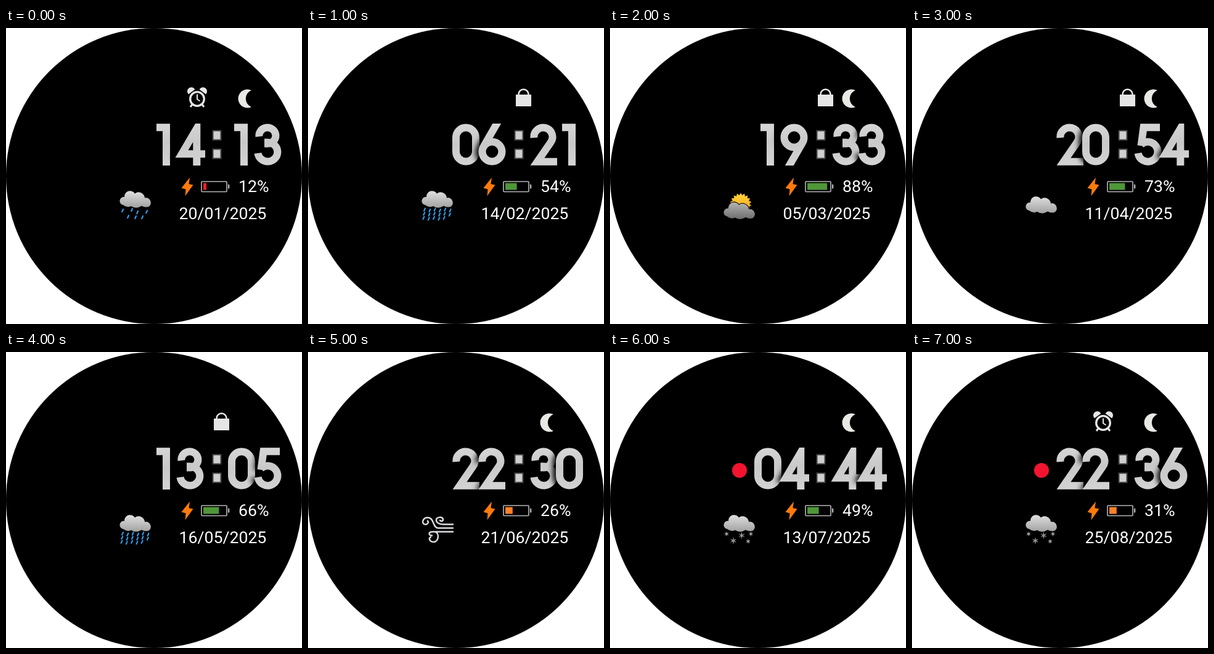
An HTML page for the animation above (8 s loop, 480 by 480 pixels).

```html
<!DOCTYPE html>
<html lang="en">
<head>
<meta charset="utf-8">
<title>Watch face</title>
<style>
  html, body { margin: 0; width: 100%; height: 100%; overflow: hidden; background: #fff; }
  svg { display: block; width: 100%; height: 100%; }
  text { font: 26.67px Roboto, sans-serif; fill: #fff; }
  .digit { fill: none; stroke: url(#metal); stroke-width: 12; stroke-miterlimit: 6; }
  .over { filter: drop-shadow(-5px 1px 4px #000); }
  .drops { stroke: #2f9be8; stroke-width: 2.2; stroke-linecap: round; }
  .flakes { fill: none; stroke: #b4b4b4; stroke-width: .9; }
  .wind { fill: none; stroke: #dcdce2; stroke-width: 2.5; stroke-linecap: round; }
</style>
</head>
<body>
<svg viewBox="0 0 480 480">
  <defs>
    <linearGradient id="metal" gradientUnits="userSpaceOnUse" x1="0" y1="0" x2="10" y2="68">
      <stop stop-color="#d8d8d8"/><stop offset=".5" stop-color="#c9c9c9"/><stop offset="1" stop-color="#d3d3d3"/>
    </linearGradient>
    <linearGradient id="light" gradientUnits="userSpaceOnUse" x1="0" y1="265" x2="0" y2="291">
      <stop stop-color="#dedede"/><stop offset="1" stop-color="#a2a2a2"/>
    </linearGradient>
    <linearGradient id="dull" gradientUnits="userSpaceOnUse" x1="0" y1="265" x2="0" y2="291">
      <stop stop-color="#b2b2b2"/><stop offset="1" stop-color="#6f6f6f"/>
    </linearGradient>
    <linearGradient id="sun" x1="0" y1="0" x2="0" y2="1">
      <stop stop-color="#ffd63c"/><stop offset="1" stop-color="#f59a14"/>
    </linearGradient>
    <clipPath id="band"><rect y="155" width="480" height="68"/></clipPath>
    <path id="cloud" d="M190 287A6.500 6.500 0 1 1 192 274A9.200 9.200 0 0 1 209 268.500A10 10 0 0 1 225 275.500A8.100 8.100 0 0 1 232 289.500Q226 292 220 288.500Q211 294 203 289Q196 292 190 287Z"/>
  </defs>

  <circle cx="240" cy="240" r="240"/>

  <g id="alarm" fill="none" stroke="#e6e6e6">
    <circle cx="310" cy="115" r="11.300" stroke-width="3.300"/>
    <path d="M310 107.500V115.500L314.500 118.500" stroke-width="2"/>
    <path d="M302 124L299 128M318 124L321 128" stroke-width="3"/>
    <path d="M296 106A5.300 5.300 0 0 1 305 99.500ZM324 106A5.300 5.300 0 0 0 315 99.500Z" fill="#e6e6e6" stroke-width="2"/>
  </g>
  <g id="lock" fill="#e6e6e6">
    <rect x="337" y="108" width="25" height="19"/>
    <path d="M341.500 109V107.500A8 8 0 0 1 357.500 107.500V109" fill="none" stroke="#e6e6e6" stroke-width="2.600"/>
  </g>
  <path id="moon" d="M398 101A15 15 0 1 0 398 128A14.500 14.500 0 0 1 398 101Z" fill="#e8e8e4"/>

  <g id="clock" clip-path="url(#band)"></g>
  <g fill="#cfcfcf" stroke="#444" stroke-width="2">
    <rect x="335.500" y="166.500" width="13" height="15"/>
    <rect x="335.500" y="196.500" width="13" height="15"/>
  </g>

  <circle id="link" cx="210" cy="192" r="12" fill="#f3142f"/>

  <path d="M298 242.500L284.500 259.500L291.500 261.500L290.500 272.500L303.500 254.500L296.500 253Z" fill="#ff7a0c"/>
  <rect x="317" y="249" width="41" height="16.500" rx="1" fill="none" stroke="#b8b8b8" stroke-width="1.600"/>
  <path d="M360 253.500H361Q362.300 253.500 362.300 255V259Q362.300 260.500 361 260.500H360Z" fill="#b8b8b8"/>
  <rect id="level" x="320" y="251.500" height="11"/>
  <text id="percent" x="377" y="266"></text>
  <text id="date" x="280.500" y="310"></text>
  <g id="weather"></g>
</svg>

<script>
const $ = id => document.getElementById(id);

const ring = y => `M39.5 ${y}a16 16 0 1 1-32 0a16 16 0 1 1 32 0z`;
const glyphs = {
  0: 'M7 22.5A16 16 0 0 1 39 22.500V45.500A16 16 0 0 1 7 45.500Z',
  1: 'M11 6.300H27V68',
  2: 'M7.500 23A15 15 0 1 1 34.500 30.500L13 61.700H45',
  3: 'M9.500 21A13.500 13 0 1 1 23 32.500H18M18 30.500H23.500A16 15.500 0 1 1 7.500 48',
  4: 'M48 49.300H10L34.300 8V68',
  5: 'M43 6.300H16.500L12.500 36M12.200 34.200A16 16 0 1 1 7.600 48',
  6: 'M9.600 37.500L34.700 -6' + ring(45.5),
  9: 'M37.400 30.500L12.300 74' + ring(22.5)
};

// The second digit of each pair casts a shadow on the first.
const columns = [233, 275, 359, 401];
const drawTime = time => [...time.replace(':', '')].map((n, i) =>
  `<g class="${i % 2 ? 'over' : ''}"><path class="digit" transform="translate(${columns[i]} 155)" d="${glyphs[n]}"/></g>`
).join('');

const cloud = (paint, dy = 0, extra = '') =>
  `<use href="#cloud" y="${dy}" fill="url(#${paint})" ${extra}/>`;

const drops = points => '<path class="drops" d="' +
  points.map(([x, y]) => `M${x + 1} ${y - 2}l-1.800 4`).join('') + '"/>';

const flakes = points => '<path class="flakes" d="' + points.map(([x, y, r]) =>
  [0, 1, 2].map(k => {
    const a = Math.PI * (k / 3 + .5), dx = r * Math.cos(a), dy = r * Math.sin(a);
    return `M${x - dx} ${y - dy}L${x + dx} ${y + dy}`;
  }).join('') + `M${x - r / 2} ${y}l${r / 2} ${-r / 2}l${r / 2} ${r / 2}l${-r / 2} ${r / 2}z`
).join('') + '"/>';

function sun(cx, cy) {
  const pts = Array.from({ length: 36 }, (_, i) => {
    const r = i % 2 ? 14 : 17.5, a = i * Math.PI / 18;
    return (cx + r * Math.sin(a)) + ',' + (cy - r * Math.cos(a));
  });
  return `<polygon points="${pts.join(' ')}" fill="url(#sun)"/>`;
}

const downpour = Array.from({ length: 17 }, (_, i) => {
  const row = Math.floor(i / 6);
  return [189 + (i % 6) * 8.3 - row * .8, 294.500 + row * 6.700 + (i % 2) * 1.500];
});

const skies = {
  rain: cloud('light') + drops([[189, 296], [204, 295], [213, 299], [228, 298], [198, 306], [221, 307], [210, 307]]),
  heavy: cloud('light') + drops(downpour),
  cloudy: cloud('light', 9),
  sunny: sun(212, 285) + cloud('dull', 18.5, 'stroke="#000" stroke-width="2" paint-order="stroke"'),
  wind: '<path class="wind" d="M235 279.500H222C212 280 207.500 276 208 272C209 267 218 267 219 271C219 275 215 275 214 273' +
    'M235 285.500H211C202 285.500 205 268.500 194 268.500C187 268.500 184 276 188 279C192 281 197 277 194 274' +
    'M235 291.500H202C195 291.500 195 298 201 297.500M207 292C213 294 212 308 204 308C197 308 195 302 199 300"/>',
  snow: cloud('light') + flakes([[189, 295, 3.500], [213.5, 297.5, 5], [228.5, 295, 3.500], [200, 306, 5], [224, 307, 3.500]])
};

// time, date, charge, sky, visible icons
const scenes = [
  ['14:13', '20/01/2025', 12, 'rain', 'alarm moon'],
  ['06:21', '14/02/2025', 54, 'heavy', 'lock'],
  ['19:33', '05/03/2025', 88, 'sunny', 'lock moon'],
  ['20:54', '11/04/2025', 73, 'cloudy', 'lock moon'],
  ['13:05', '16/05/2025', 66, 'heavy', 'lock'],
  ['22:30', '21/06/2025', 26, 'wind', 'moon'],
  ['04:44', '13/07/2025', 49, 'snow', 'moon link'],
  ['22:36', '25/08/2025', 31, 'snow', 'alarm moon link']
];

function show([time, date, charge, sky, icons]) {
  $('clock').innerHTML = drawTime(time);
  $('date').textContent = date;
  $('percent').textContent = charge + '%';
  $('level').setAttribute('width', 5 + 6.8 * Math.floor(charge / 20));
  $('level').setAttribute('fill', charge < 20 ? '#f3202b' : charge < 40 ? '#ff8126' : '#4f9739');
  $('weather').innerHTML = skies[sky];
  for (const id of ['alarm', 'lock', 'moon', 'link'])
    $(id).style.display = icons.split(' ').includes(id) ? '' : 'none';
}

let shown = -1;
const start = performance.now();
function tick() {
  const i = Math.floor((performance.now() - start) / 1000) % scenes.length;
  if (i !== shown) show(scenes[shown = i]);
  requestAnimationFrame(tick);
}
tick();
</script>
</body>
</html>
```
